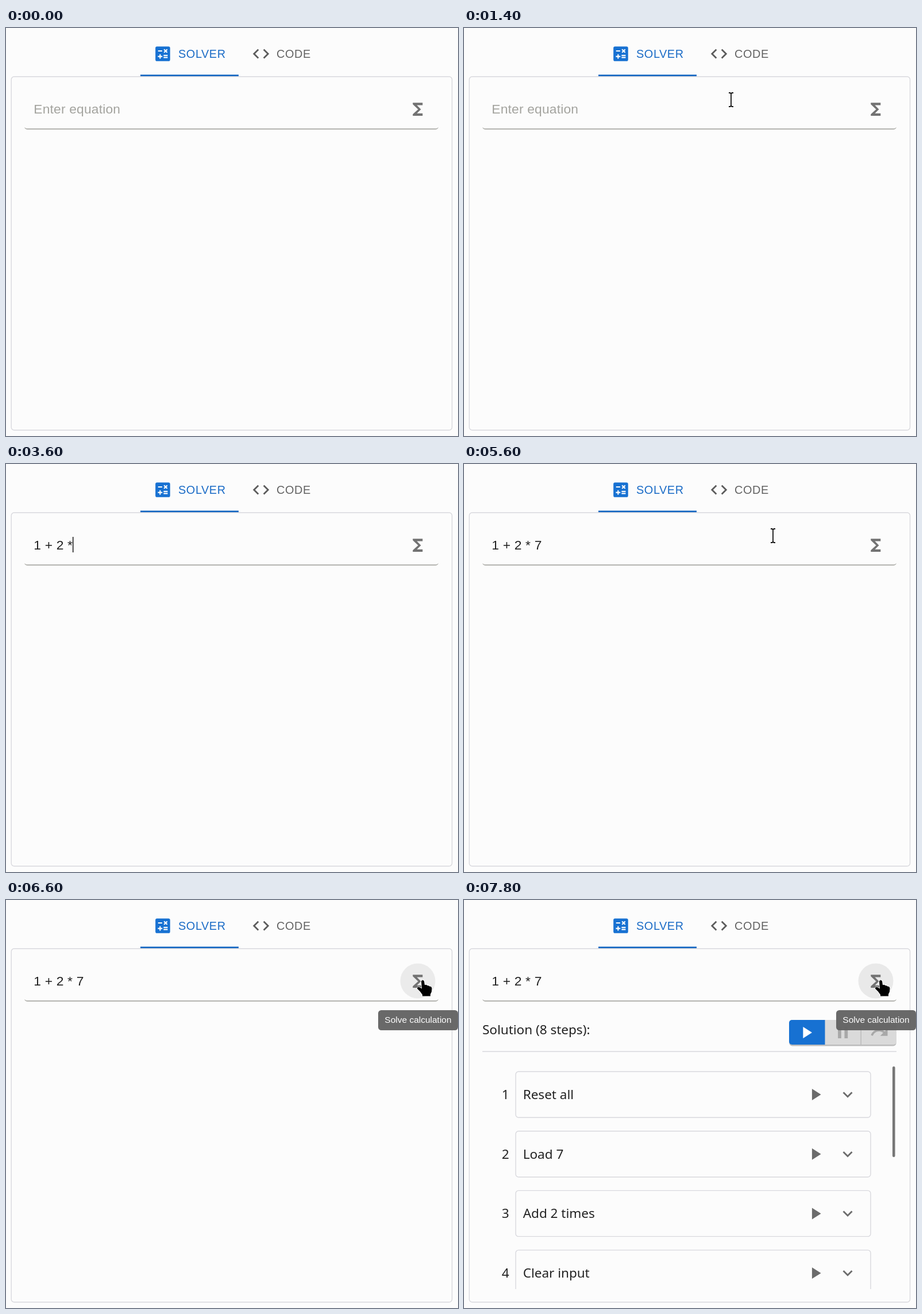
Animation of 787 by 711 pixels, one loop 8 s. Source, as an HTML page:

```html
<!DOCTYPE html>
<html lang="en">
<head>
<meta charset="utf-8">
<title>Equation solver</title>
<style>
  html, body { margin: 0; width: 100%; height: 100%; overflow: hidden; background: #fcfcfc; }
  svg { display: block; }
  text { font-family: "Liberation Sans", Arial, sans-serif; white-space: pre; }
  .tab { font-size: 19.9px; letter-spacing: .57px; }
  .field { font-size: 22.75px; letter-spacing: .21px; }
  .body { font: 22.5px "Noto Sans", sans-serif; fill: #222; }
  .line { fill: none; stroke: #d9d9de; stroke-width: 1.4; }
</style>
</head>
<body>
<svg width="787" height="711" viewBox="0 0 787 711">
  <defs>
    <path id="calc" fill-rule="evenodd" d="M5 3h14a2 2 0 0 1 2 2v14a2 2 0 0 1-2 2H5a2 2 0 0 1-2-2V5a2 2 0 0 1 2-2z
      M6.25 7.72h5v1.5h-5z M13 15.75h5v1.5h-5z M13 13.25h5v1.5h-5z
      M11.5 16h-2v2H8v-2H6v-1.5h2v-2h1.5v2h2z
      M14.09 10.95l1.41-1.41 1.41 1.41 1.06-1.06-1.41-1.42 1.41-1.41L16.91 6 15.5 7.41 14.09 6l-1.06 1.06 1.41 1.41-1.41 1.42z"/>
    <path id="code" d="M9.4 16.6L4.8 12l4.6-4.6L8 6l-6 6 6 6zM14.6 16.6l4.6-4.6-4.6-4.6L16 6l6 6-6 6z"/>
    <path id="sigma" d="M18 4H6v2l6.5 6L6 18v2h12v-3h-7l5-5-5-5h7z"/>
    <path id="play" d="M8 5v14l11-7z"/>
    <path id="pause" d="M6 19h4V5H6zM14 5v14h4V5z"/>
    <path id="redo" d="M18.4 10.6C16.55 8.99 14.15 8 11.5 8c-4.65 0-8.58 3.03-9.96 7.22L3.9 16c1.05-3.19 4.05-5.5 7.6-5.5 1.95 0 3.73.72 5.12 1.88L13 16h9V7z"/>
    <path id="more" d="M16.59 8.59L12 13.17 7.41 8.59 6 10l6 6 6-6z"/>
    <clipPath id="listClip"><rect x="32" y="266" width="722" height="412"/></clipPath>
    <clipPath id="groupClip"><rect x="566" y="209" width="187" height="43" rx="5"/></clipPath>
  </defs>

  <rect width="787" height="711" fill="#fcfcfc"/>
  <rect class="line" x="9.2" y="84.7" width="767.4" height="616" rx="5"/>

  <use href="#calc" transform="translate(255.9 28) scale(1.42)" fill="#1771d2"/>
  <text class="tab" x="300" y="52" fill="#1a6bc6">SOLVER</text>
  <use href="#code" transform="translate(427 28) scale(1.42)" fill="#5c5c5c"/>
  <text class="tab" x="471" y="52" fill="#636363">CODE</text>
  <rect x="234" y="81.3" width="171" height="2.7" fill="#1668c2"/>

  <path d="M32 172a5 5 0 0 0 5 5H748a5 5 0 0 0 5-5a5 3 0 0 1-5 3H37a5 3 0 0 1-5-3z" fill="#b4b4b0"/>
  <text id="equation" class="field" x="48.3" y="148.5"></text>
  <rect id="caret" y="127" width="1.6" height="27" fill="#222"/>
  <circle id="halo" cx="717" cy="141" r="30.5" fill="#e9e9e9"/>
  <use href="#sigma" transform="translate(699.8 124.6) scale(1.42)" fill="#727272"/>

  <g id="solution">
    <text class="body" x="32" y="234">Solution (8 steps):</text>
    <rect x="566.5" y="211" width="186" height="43.5" rx="5" fill="#bcbcbc"/>
    <g clip-path="url(#groupClip)">
      <rect x="566" y="209" width="187" height="43" fill="#dadada"/>
      <rect x="566" y="209" width="62.5" height="43" fill="#1771d2"/>
      <rect x="690.5" y="209" width="1.4" height="43" fill="#b8b8b8"/>
    </g>
    <use href="#play" transform="translate(579 214) scale(1.42)" fill="#fff"/>
    <use href="#pause" transform="translate(642.6 214) scale(1.42)" fill="#a8a8a8"/>
    <use href="#redo" transform="translate(706.3 214) scale(1.42)" fill="#a8a8a8"/>
    <path class="line" d="M32 264H753"/>
    <g id="rows" clip-path="url(#listClip)"></g>
    <rect x="746" y="290" width="4.6" height="158" rx="2.3" fill="#777"/>
  </g>

  <g id="tooltip">
    <rect x="648" y="192" width="139" height="35" rx="5.5" fill="#616161" fill-opacity=".95"/>
    <text x="659.3" y="214.3" font-size="15.5" fill="#fff">Solve calculation</text>
  </g>

  <g id="beam" fill="none">
    <path d="M-4 -12H4M-4 12H4M0 -12V12" stroke="#fff" stroke-width="4"/>
    <path d="M-4 -12H-1.5L0 -10.5L1.5 -12H4M-4 12H-1.5L0 10.5L1.5 12H4M0 -11V11" stroke="#111" stroke-width="1.8"/>
  </g>
  <path id="hand" d="M-2 2.5Q.5 -1.5 3 2.5L4 9Q7 8 8.5 10Q11 9.5 12.5 11.5Q16.5 11.5 16.5 15.5L16 21L14 25V28.5H0V26L-4 20.5L-9 15.5Q-9 11.5 -5 13L-1 15.5Z"
    fill="#000" stroke="#fff" stroke-width="1.6" paint-order="stroke"/>
</svg>
<script>
const LOOP = 8000, TICK = 200;
const $ = id => document.getElementById(id);
const show = (id, on) => $(id).setAttribute("visibility", on ? "visible" : "hidden");

// [time, value] steps: the last one reached holds
const at = (steps, t) => steps.reduce((value, [time, next]) => t >= time ? next : value, null);

const FORMULA = "1 + 2 * 7";
const TYPED = [[0, 0], [2600, 1], [2800, 2], [3000, 3], [3200, 4], [3400, 5], [3600, 7], [3800, 8], [4600, 9]];
const CARET = [[0, false], [2200, true], [5200, false], [5800, true], [6200, false]];
const POINTER = [[0, null], [1200, "beam"], [2600, null], [5600, "beam"], [6200, "hand"]];
const HALO = [[0, 0], [6200, .35], [6400, .85], [7600, 1]];
const PATH = [[1200, 445, 121], [1400, 465, 125], [2000, 528, 125], [5400, 528, 125],
              [5600, 538, 125], [6200, 712, 139], [6600, 725, 139]];

function pointAt(t) {
  const i = PATH.findIndex(([time]) => time > t);
  if (i < 1) return (i ? PATH[PATH.length - 1] : PATH[0]).slice(1);
  const [t0, x0, y0] = PATH[i - 1], [t1, x1, y1] = PATH[i];
  const k = (t - t0) / (t1 - t0);
  return [x0 + (x1 - x0) * k, y0 + (y1 - y0) * k];
}

$("rows").innerHTML = ["Reset all", "Load 7", "Add 2 times", "Clear input"].map((label, i) => `
  <g transform="translate(0 ${i * 103.7})">
    <text class="body" x="65.7" y="347">${i + 1}</text>
    <rect class="line" x="90" y="299" width="618" height="80" rx="5"/>
    <text class="body" x="102.7" y="347">${label}</text>
    <use href="#play" transform="translate(594.6 322) scale(1.42)" fill="#6c6c6c"/>
    <use href="#more" transform="translate(651 322) scale(1.42)" fill="#6c6c6c"/>
  </g>`).join("");

function draw(t) {
  const count = at(TYPED, t), equation = $("equation");
  equation.textContent = FORMULA.slice(0, count) || "Enter equation";
  equation.setAttribute("fill", count ? "#222" : "#a3a39e");
  const end = count ? equation.getComputedTextLength() : 0;
  $("caret").setAttribute("x", 48 + end);
  show("caret", at(CARET, t));

  const pointer = at(POINTER, t), [x, y] = pointAt(t);
  for (const id of ["beam", "hand"]) {
    show(id, pointer === id);
    $(id).setAttribute("transform", `translate(${x} ${y})`);
  }
  $("halo").setAttribute("opacity", at(HALO, t));
  show("tooltip", t >= 6400);
  show("solution", t >= 7600);
}

const start = performance.now();
let last = -1;
function frame() {
  const t = Math.floor((performance.now() - start) % LOOP / TICK) * TICK;
  if (t !== last) draw(last = t);
  requestAnimationFrame(frame);
}
frame();
</script>
</body>
</html>
```
